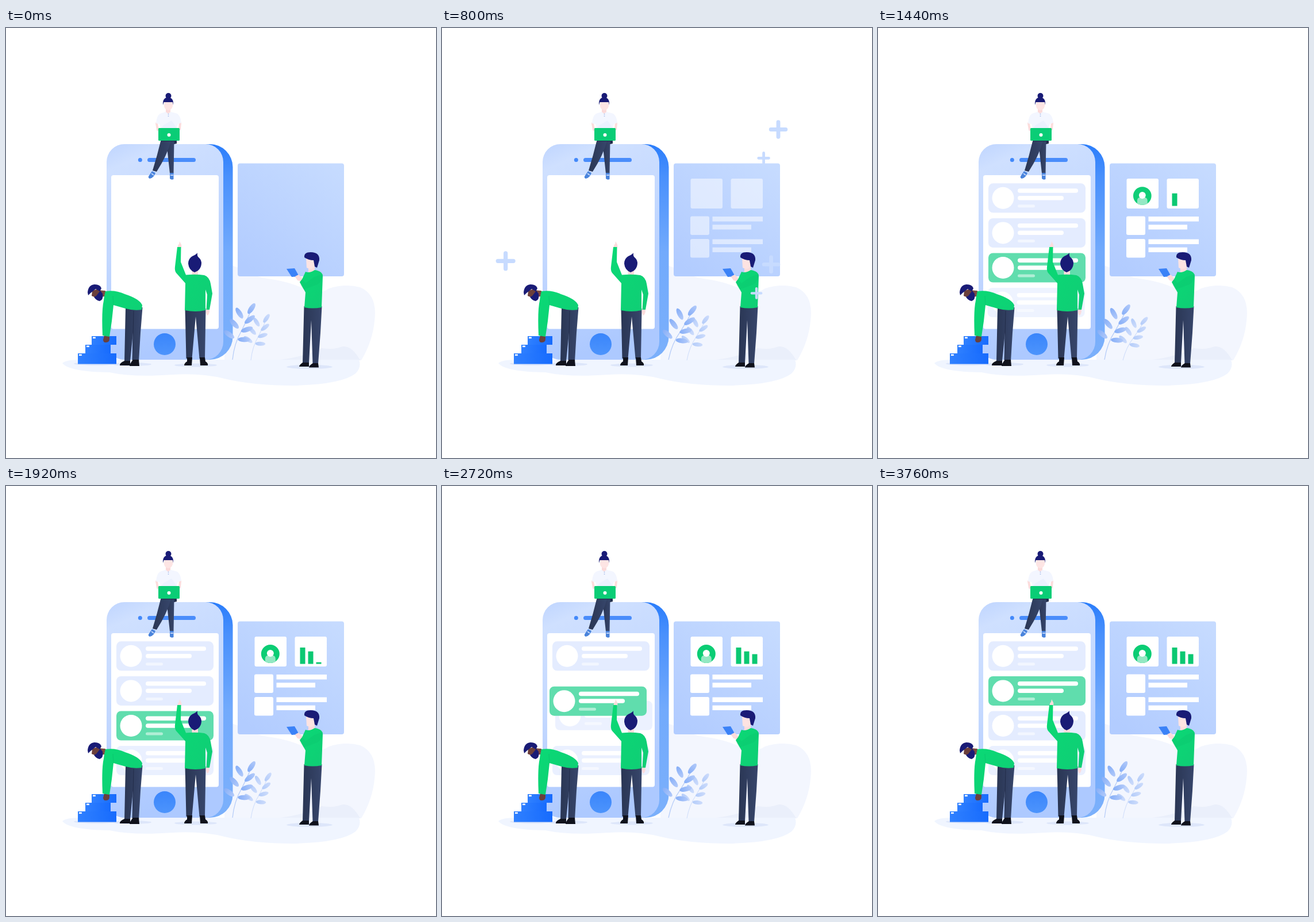
Write an HTML page that moves like this. It is 748 px wide and 748 px high and loops after 3840 ms.

```html
<!DOCTYPE html>
<html lang="en">
<head>
<meta charset="utf-8">
<title>Building an app</title>
<style>
html,body{margin:0;width:100%;height:100%;overflow:hidden;background:#fff}
svg{display:block;width:100vw;height:100vh}
</style>
</head>
<body>
<svg id="stage" viewBox="0 0 748 748">
<defs>
  <linearGradient id="front" x1="0" y1="0" x2="0.25" y2="1"><stop offset="0" stop-color="#bfd5ff"/><stop offset=".12" stop-color="#cfe0ff"/><stop offset=".5" stop-color="#c3d8ff"/><stop offset="1" stop-color="#adc9ff"/></linearGradient>
  <linearGradient id="side" x1="0" y1="0" x2="0" y2="1"><stop offset="0" stop-color="#2a7dfb"/><stop offset=".15" stop-color="#4990fc"/><stop offset=".5" stop-color="#72aafc"/><stop offset="1" stop-color="#7bb0fb"/></linearGradient>
  <linearGradient id="panel" x1="0.9" y1="0" x2="0.2" y2="1"><stop offset="0" stop-color="#c6dbff"/><stop offset="1" stop-color="#b2ccff"/></linearGradient>
  <linearGradient id="home" x1="0" y1="0" x2="0" y2="1"><stop offset="0" stop-color="#3a85fb"/><stop offset="1" stop-color="#4d94fc"/></linearGradient>
  <linearGradient id="shirt" x1="0" y1="0" x2="1" y2="1"><stop offset="0" stop-color="#0ad975"/><stop offset="1" stop-color="#10cd75"/></linearGradient>
  <linearGradient id="legs" x1="0" y1="0" x2="1" y2="0"><stop offset="0" stop-color="#2a3654"/><stop offset="1" stop-color="#37466b"/></linearGradient>
  <linearGradient id="box" x1="0" y1="0" x2="1" y2="0"><stop offset="0" stop-color="#2f80ff"/><stop offset="1" stop-color="#176bfd"/></linearGradient>
  <linearGradient id="leaf" x1="0" y1="0" x2="1" y2="0"><stop offset="0" stop-color="#86aef7"/><stop offset="1" stop-color="#b2cafa"/></linearGradient>
</defs>

<!-- landscape -->
<path fill="#f3f6fe" d="M380 410Q400 413 420 426Q442 435 468 438Q502 444 527 458Q546 464 562 453Q590 444 616 451Q642 462 642 496Q641 540 618 578H380Z"/>
<path fill="#e7edfa" d="M470 578Q520 572 549 557Q570 560 582 555Q600 549 616 578Z" opacity=".75"/>
<path fill="#f0f5ff" d="M98 583Q104 576 140 577H614Q619 590 608 601Q584 620 500 622Q430 622 380 610Q340 600 290 603Q220 608 180 599Q110 598 98 583Z"/>
<g fill="#dde6fa"><ellipse cx="158" cy="584" rx="40" ry="3"/><ellipse cx="219" cy="585" rx="34" ry="3"/></g>

<!-- phone -->
<rect x="250" y="202" width="144.500" height="375" rx="40" fill="url(#side)"/>
<rect x="175" y="202" width="203" height="375" rx="31" fill="url(#front)"/>
<rect x="183" y="256" width="187" height="267.500" rx="4" fill="#fff"/>
<circle cx="233.300" cy="229.500" r="3.500" fill="#4389fa"/>
<rect x="246" y="226" width="84" height="7" rx="3.500" fill="#4a8dfb"/>
<circle cx="276" cy="550" r="19" fill="url(#home)"/>
<g fill="#dde6fa"><ellipse cx="330" cy="586.500" rx="37" ry="3"/><ellipse cx="528" cy="589.500" rx="40" ry="3.500"/></g>
<g id="cards"></g>

<!-- panel -->
<rect x="403" y="235.500" width="185" height="196.500" rx="4" fill="url(#panel)"/>
<g id="layout" fill="#fff"></g>
<g id="avatar">
  <circle r="16" fill="#0bcd74"/>
  <path fill="#93e8c3" d="M-9 14V8Q-9 2 0 2Q9 2 9 8V14Q0 18 -9 14Z"/>
  <circle cy="-1" r="6" fill="#fff"/>
</g>
<g id="bars" fill="#0bc872"></g>

<!-- woman with laptop -->
<g>
  <path fill="#222d4d" d="M269 195H297V201Q284 205 270 201Z"/>
  <path fill="url(#legs)" d="M279 197H292.500L291.500 253H285Z"/>
  <path fill="url(#legs)" d="M269 197H287Q280 222 262 250L255 248Q263 222 269 197Z"/>
  <path fill="#4a84dc" d="M254 249L260 252Q257 261 250 262Q247 261 248 258ZM285 252H291.500V263Q288 265 285 262Z"/>
  <path fill="none" stroke="#dfe9ff" stroke-width="1.500" d="M253 253L257 256M286 256H291"/>
  <path fill="none" stroke="#fcdcdc" stroke-width="4" stroke-linecap="round" d="M262 166L264 177M303 165L302 176"/>
  <path fill="#f3f6ff" d="M277 146H287L298 149Q304 154 305 165L299 167L297 174H269L267 167L261 166Q262 153 268 149Z"/>
  <path fill="#e2eafc" d="M274 169L288 161L297 174H270Z" opacity=".45"/>
  <path fill="#fbdada" d="M278 138H286V146L282 149L278 146Z"/>
  <path fill="#fde5e4" d="M275 127H290V136Q288 143 282.500 143Q276 142 275 136Z"/>
  <circle cx="282.500" cy="118" r="5" fill="#191b76"/>
  <path fill="#191b76" d="M273 134Q272 121 282 120.500Q292 121 291 134L290 129H274.500Z"/>
  <path stroke="#9fb6e8" stroke-width="1.500" stroke-dasharray="1.500 2" d="M282.500 149V154"/>
  <rect x="265" y="174" width="37" height="22" rx="1.500" fill="#0acd76"/>
  <circle cx="283.500" cy="186" r="3" fill="#fff"/>
</g>

<g id="behind"></g>

<!-- bending man -->
<g id="boxes"></g>
<g>
  <path fill="url(#legs)" d="M222 486H237.500L234 530L231 580H220L221 530L216 580H206L208 487Z"/>
  <path fill="none" stroke="#222c49" d="M222 492L220 578"/>
  <path fill="#10121c" d="M206 579H216V587H198Q197 583 206 579ZM221 577H231L232 588H215Q215 584 221 577Z"/>
  <path fill="#69403d" d="M171 535H180V541Q180 547 173 547Q169 547 169 542Z"/>
  <path fill="url(#shirt)" d="M172 458Q190 455 207 463Q232 471 237 482L236 490Q222 492 208 488L187 482L184 510L180 537L168 535Q166 492 170 474Z"/>
  <path fill="none" stroke="#0bb768" opacity=".5" d="M186 466L187 482"/>
  <path fill="#7a4a43" d="M160 456L173 457L171 467L163 468Z"/>
  <path fill="#6b3f3b" d="M150 457L163 453L167 463L160 471L154 468L149 466Z"/>
  <path fill="#191b76" d="M142 460Q143 447 154 446Q164 446 166 453L163 458L156 454L147 461L143 465ZM157 466L164 457L168 462Q170 473 163 475Q157 474 153 468Z"/>
</g>

<!-- man tapping the phone -->
<g>
  <path fill="url(#legs)" d="M311.500 488H347.500L346 575H336.500L330 502L323.500 575H313.500Z"/>
  <path fill="#10121c" d="M315 573H324L323 587H310Q310 583 315 580ZM337 573H346L347 580Q352 583 351 587H338Z"/>
  <path fill="#fcdcdc" d="M348 489H353.500Q355 495 351 500Q347 498 348 489ZM298.500 382Q299 376 301 376L302 371L304 375Q306 377 305 382ZM323.500 421H334V431H323.500Z"/>
  <path fill="url(#shirt)" d="M298 381H304.500L304 407L313 429.500Q330 428 345 430Q354 433 356 445L359 462L354 490H348.500L350 464L347 455V491Q330 495 311 491L312 444L296 426Q293 422 294 415Z"/>
  <path fill="#191b76" d="M333 391Q331 394 324 397Q317 401 317 410Q318 421 328 425Q340 421 340 408Q339 402 335 399Q332 396 333 391Z"/>
</g>

<!-- man with tablet -->
<g>
  <path fill="url(#legs)" d="M518.500 484H549.500L547 530L543 584H533.500L531 508L527 583H516Z"/>
  <path fill="#10121c" d="M516 582H527V589H510Q510 586 516 582ZM534 583H543L544 590.500H527Q527 587 534 583Z"/>
  <path fill="#fcdcdc" d="M526 414H537V426H526ZM505 430L515 434L516 441L507 439L503 433Z"/>
  <path fill="url(#shirt)" d="M521 424Q528 427 537 421Q551 423 551 432L549 486Q533 489 519 486L521 460L511 442L515 437Z"/>
  <path fill="#0bbf6c" opacity=".3" d="M551 428Q549 442 542 446L518 455Q513 449 511 442L515 437L521 444L536 433Z"/>
  <path fill="#fde3e2" d="M522 400H537V414Q534 419 528 419L523 417Z"/>
  <path fill="#191b76" d="M519 399Q518 390 530 390Q546 390 545 404L541 417L537 415L535 404Q526 404 519 399Z"/>
  <path fill="#3b82f7" d="M488 419L502 418L510 432L497 433Z"/>
  <path fill="#fcdcdc" d="M503 432L509 429L515 435L512 440Z"/>
</g>

<g id="smallPlant"></g>
<g id="bigPlant"></g>
<g id="above"></g>
</svg>
<script>
const LOOP = 3840, STEP = 80, PITCH = 60.6;
const $ = id => document.getElementById(id);
const span = (t, a, b) => Math.min(1, Math.max(0, (t - a) / (b - a)));
const smooth = u => u * u * (3 - 2 * u);
const out = u => Math.sin(u * Math.PI / 2);

function set(el, attrs) {
  for (const k in attrs) el.setAttribute(k, attrs[k]);
  return el;
}
function add(parent, tag, attrs = {}) {
  return parent.appendChild(set(document.createElementNS($('stage').namespaceURI, tag), attrs));
}
const rect = (parent, x, y, width, height, more) => add(parent, 'rect', {x, y, width, height, ...more});

// panel layout: two tiles above two list lines
for (const i of [0, 1]) {
  const g = $('layout'), y = 39.5 * i;
  rect(g, 432.5 + 70 * i, 262, 55.5, 52, {rx: 3});
  rect(g, 432, 327.5 + y, 33, 32.5, {rx: 3});
  rect(g, 470.5, 328 + y, 87.5, 8.5);
  rect(g, 470.5, 342.2 + y, 67.5, 8.3);
}

// stacked boxes
[[125, 566, 67, 18.5], [138, 551, 44, 15], [149, 536, 43, 15]].forEach(([x, y, w, h]) => {
  rect($('boxes'), x, y, w, h, {fill: 'url(#box)'});
  rect($('boxes'), x + 2, y + 1.5, 4.8, 2.6, {fill: '#fff'});
});

function card(green) {
  const g = add($('cards'), 'g');
  const line = (y, w, h, opacity) => rect(g, 51, y, w, h, {rx: h / 2, fill: '#fff', opacity});
  rect(g, 0, 0, 169, 51, {rx: 8, fill: green ? '#60ddad' : '#e4ecff'});
  add(g, 'circle', {cx: 25.5, cy: 25.5, r: 19, fill: '#fff'});
  line(9, 105, 7.5, 1);
  line(21.7, 80, 7.5, 1);
  line(37, 30, 5, .5);
  return g;
}
// the green one comes last so that it lies on top
const cards = [0, 1, 3, 2].map(i => ({i, el: card(i === 2)}));

const bars = [28.5, 21.8, 17].map((h, i) =>
  ({h, start: 1240 + 320 * i, el: rect($('bars'), 511.5 + 14 * i, 0, 9, 0)}));

// three leaf pairs that turn upright towards the tip
function plant(id) {
  const g = add($(id), 'g');
  const leaf = (x, y, a) => add(g, 'ellipse', {rx: 10.8, ry: 4.3, fill: 'url(#leaf)', transform: `translate(${x} ${y}) rotate(${a})`});
  add(g, 'path', {d: 'M0 0Q3 -29 16 -51Q24 -67 32 -85', fill: 'none', stroke: '#b7cdf8', 'stroke-width': 1.3});
  for (let j = 0; j < 3; j++) {
    leaf(20 + 5 * j, -35 - 17.5 * j, 2 - 20 * j);
    leaf(-6 + 9 * j, -44 - 18.5 * j, 36 + 11 * j);
  }
  leaf(33, -89, -56);
}
plant('bigPlant');
plant('smallPlant');
$('smallPlant').setAttribute('opacity', .58);

// plus signs drift up and settle: layer, birth, end point, travel, size
const LIFE = 900;
const pluses = [
  ['behind', 240, 97, 394, -80, -66, 36],
  ['above', 400, 600, 129, 42, -133, 36],
  ['above', 400, 571, 187, 32, -110, 25],
  ['above', 400, 619, 358, 130, -149, 35],
  ['above', 400, 591, 416, 123, -127, 23]
].map(([layer, birth, x, y, dx, dy, size]) => ({birth, x, y, dx, dy, size, el: add($(layer), 'path', {
  d: 'M-.39 0H.39M0 -.39V.39', fill: 'none', stroke: '#c7dbff', 'stroke-width': .21, 'stroke-linecap': 'round'
})}));

const sway = t => (1 - Math.cos(2 * Math.PI * t / 1920)) / 2;

function draw(t) {
  // the layout pulses once before it settles
  const pulse = .76 + .24 * Math.cos(2 * Math.PI * (Math.min(t, 1120) - 1120) / 640);
  $('layout').setAttribute('opacity', span(t, 0, 510) * pulse);

  for (const p of pluses) {
    const life = span(t, p.birth, p.birth + LIFE), left = 1 - out(life);
    set(p.el, {
      transform: `translate(${p.x - p.dx * left} ${p.y - p.dy * left}) scale(${p.size * (1 - .25 * left)})`,
      opacity: span(life, 0, .4) * (1 - span(life, .8, 1))
    });
  }

  // the second and third cards trade places, each stepping aside
  const swap = PITCH * smooth(span(t, 2290, 2960));
  const aside = smooth(span(t, 2290, 2600)) - smooth(span(t, 2840, 3160));
  for (const {i, el} of cards) {
    const shown = span(t, 840 + 150 * i, 1020 + 150 * i);
    const dir = i === 1 ? 1 : i === 2 ? -1 : 0;
    const x = 192 - 40 * (1 - out(shown)) + 5 * dir * aside;
    set(el, {
      transform: `translate(${x} ${270.3 + PITCH * i + dir * swap})`,
      opacity: shown * (i === 3 ? .75 : 1) * (dir > 0 ? 1 - .3 * aside : 1)
    });
  }

  const pop = out(span(t, 1200, 1480));
  set($('avatar'), {opacity: pop, transform: `translate(459.8 292) scale(${.6 + .4 * pop})`});
  for (const b of bars) {
    const height = b.h * out(span(t, b.start, b.start + 360));
    set(b.el, {y: 309.5 - height, height});
  }

  set($('bigPlant'), {transform: `translate(394 577) rotate(${5.9 * sway(t)})`});
  set($('smallPlant'), {transform: `translate(426 578) scale(.82) rotate(${8.6 * sway(Math.max(0, t - 320))})`});
}

const begin = performance.now();
function tick() {
  const t = (performance.now() - begin) % LOOP;
  draw(Math.floor(t / STEP) * STEP);
  requestAnimationFrame(tick);
}
tick();
</script>
</body>
</html>
```
